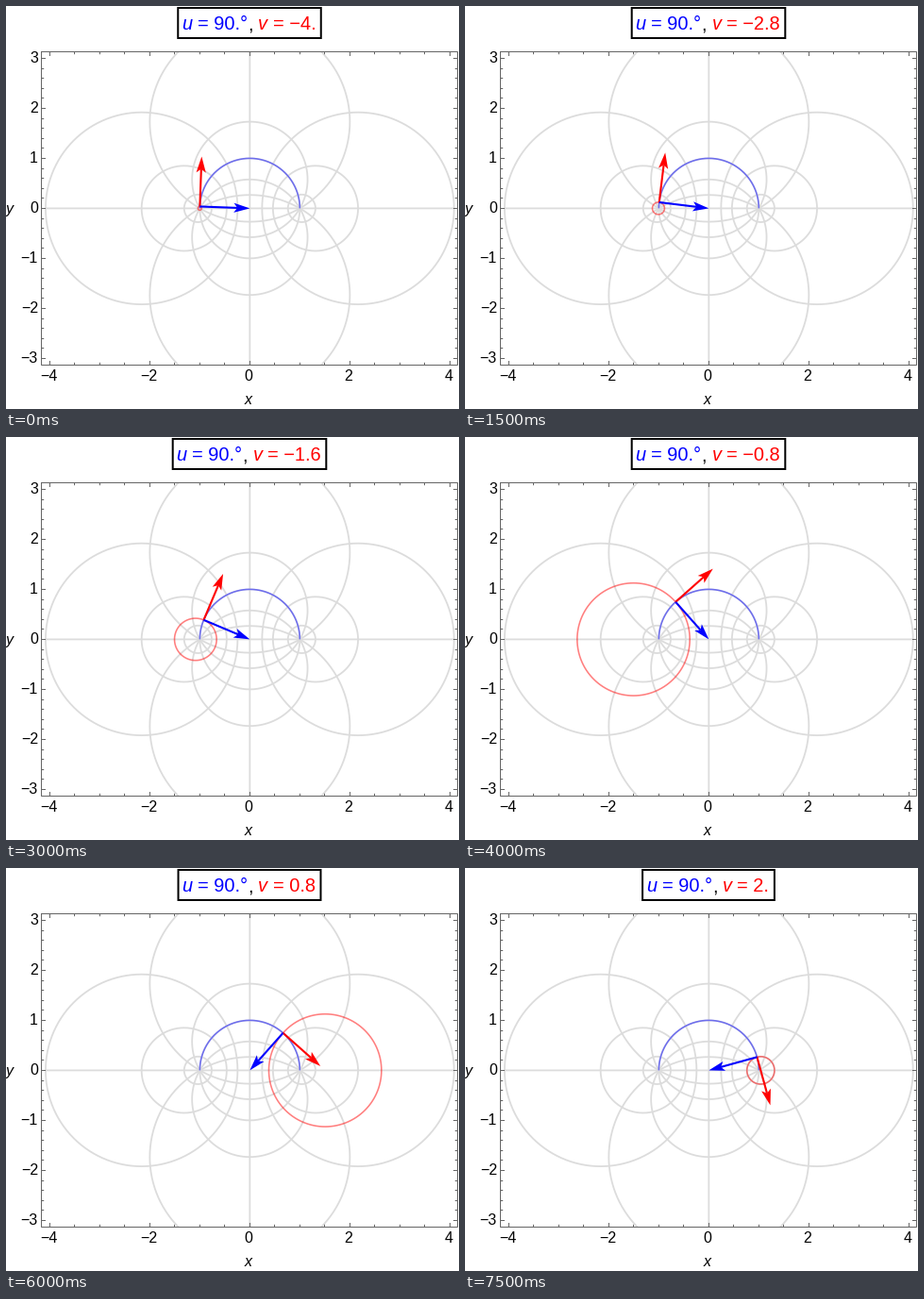
Recreate the animation shown at these times as a matplotlib script. Size 480x427 px, loop 8000 ms.

```python
import numpy as np
import matplotlib.pyplot as plt
from matplotlib.animation import FuncAnimation
from matplotlib.patches import Polygon, Rectangle

W, H, DPI = 480, 427, 64
PT = 72 / DPI                          # points per pixel
CX, CY, UNIT = 258.35, 214.4, 53       # plot origin and scale in pixels
LEFT, RIGHT, TOP, BOTTOM = 37.5, 478.5, 48.5, 380.5
FRAMES, STEP_MS = 16, 500
GREY, FRAME, BLUE, RED = "#dcdcdc", "#666666", "#0000ff", "#ff0000"

plt.rcParams["font.family"] = "Liberation Sans"
fig = plt.figure(figsize=(W / DPI, H / DPI), dpi=DPI, facecolor="white")
ax = fig.add_axes([0, 0, 1, 1])
ax.set_xlim(0, W)
ax.set_ylim(H, 0)
ax.axis("off")
clip = Rectangle((LEFT, TOP), RIGHT - LEFT, BOTTOM - TOP, transform=ax.transData)


def px(x, y):
    return CX + UNIT * np.asarray(x), CY - UNIT * np.asarray(y)


def line(x, y, color, width, **kw):
    item, = ax.plot(x, y, color=color, lw=width * PT, snap=False,
                    solid_capstyle="butt", solid_joinstyle="miter", **kw)
    return item


def curve(points, color, width, **kw):
    item = line(*px(*points), color, width, **kw)
    item.set_clip_path(clip)
    return item


def label(x, y, s, size=16, **kw):
    return ax.text(x, y, s, fontsize=size * PT, va="baseline", **kw)


def circle(x, y, r, start=0, stop=2 * np.pi):
    a = np.linspace(start, stop, 241)
    return x + r * np.cos(a), y + r * np.sin(a)


def v_circle(v):
    if abs(v) < 1e-9:
        return np.zeros(2), np.array([-4, 4])
    return circle(1 / np.tanh(v), 0, 1 / abs(np.sinh(v)))


def u_circle(u):
    return circle(0, 1 / np.tan(u), 1 / abs(np.sin(u)))


# Bipolar grid
for v in (-2, -1, -0.5, 0, 0.5, 1, 2):
    curve(v_circle(v), GREY, 1.8, zorder=1)
for deg in (30, 60, 90, 120, 150):
    curve(u_circle(np.radians(deg)), GREY, 1.8, zorder=1)
reach = 1 / np.tanh(0.25)
curve(([-reach, reach], [0, 0]), GREY, 1.8, zorder=1)

# Frame and ticks
line([LEFT, RIGHT, RIGHT, LEFT, LEFT], [TOP, TOP, BOTTOM, BOTTOM, TOP],
     FRAME, 1, zorder=5)


def ticks(count, step, major):
    for i in range(-count, count + 1):
        yield i * step, 4.5 if i % major == 0 else 2.7


for t, size in ticks(8, 0.5, 4):
    x = np.floor(CX + UNIT * t) + 0.5
    line([x, x], [BOTTOM, BOTTOM - size], FRAME, 1, zorder=5)
    line([x, x], [TOP, TOP + size], FRAME, 1, zorder=5)
for t, size in ticks(15, 0.2, 5):
    y = np.floor(CY - UNIT * t) + 0.5
    line([LEFT, LEFT + size], [y, y], FRAME, 1, zorder=5)
    line([RIGHT, RIGHT - size], [y, y], FRAME, 1, zorder=5)


def signed(n):
    return str(n).replace("-", "\u2212")


for n in range(-4, 5, 2):
    label(257 + UNIT * n, 397, signed(n), ha="center")
for n in range(-3, 4):
    label(34, 219 - UNIT * n, signed(n), ha="right")
label(257, 422, "x", style="italic", ha="center")
label(4, 220, "y", style="italic", ha="center")


class Arrow:
    NECK = 13.2
    HEAD = np.array([[0, 0], [-17, 5.1], [-NECK, 0], [-17, -5.1]])

    def __init__(self, color, z):
        self.shaft = line([], [], color, 2.1, zorder=z)
        self.head = ax.add_patch(Polygon(self.HEAD, fc=color, lw=0, zorder=z))

    def place(self, tail, way):
        start = np.array(px(*tail))
        along = np.array([way[0], -way[1]])
        across = np.array([-along[1], along[0]])
        tip = start + UNIT * along
        neck = tip - self.NECK * along
        self.shaft.set_data([start[0], neck[0]], [start[1], neck[1]])
        self.head.set_xy(tip + self.HEAD @ np.array([along, across]))


class Title:
    """Boxed row of coloured text, centred over the plot."""
    SIZE, MID, PAD = 20, 258, 5.75
    EM = {".": 0.278, ",": 0.278, " ": 0.278, "=": 0.584, "\u2212": 0.584,
          "\u00b0": 0.4, "v": 0.5}
    LOOK = [(BLUE, "italic"), (BLUE, "normal"), ("black", "normal"),
            (RED, "italic"), (RED, "normal")]

    def __init__(self):
        self.box = ax.add_patch(Rectangle((0, 2), 1, 32, fc="white", ec="black",
                                          lw=2 * PT, joinstyle="miter", snap=False))
        self.parts = [label(0, 25, "", self.SIZE, color=c, style=s, zorder=6)
                      for c, s in self.LOOK]

    def advance(self, s):
        return self.SIZE * sum(self.EM.get(ch, 0.556) for ch in s)

    def show(self, value):
        words = ["u", "= 90.\u00b0", ",", "v", "= " + value]
        gaps = [" ", "", " ", " ", ""]
        width = sum(self.advance(w + g) for w, g in zip(words, gaps))
        half = width / 2 + self.PAD - 1
        self.box.set_x(self.MID - half)
        self.box.set_width(2 * half)
        pen = self.MID - width / 2 - 0.8
        for part, word, gap in zip(self.parts, words, gaps):
            part.set_text(word)
            part.set_x(pen)
            pen += self.advance(word + gap)


def number(v):
    s = f"{abs(v):.1f}"
    if s.endswith("0"):
        s = s[:-1]
    return ("\u2212" if v < 0 else "") + s


curve(circle(0, 0, 1, 0, np.pi), BLUE, 1.6, alpha=0.5, zorder=2)
ring = curve(v_circle(1), RED, 1.6, alpha=0.5, zorder=3)
red_arrow = Arrow(RED, 6)
blue_arrow = Arrow(BLUE, 7)
title = Title()


def update(i):
    v = (4 * i - 40) / 10
    x, y = np.tanh(v), 1 / np.cosh(v)
    ring.set_data(*px(*v_circle(v)))
    blue_arrow.place((x, y), (-x, -y))
    red_arrow.place((x, y), (y, -x))
    title.show(number(v))
    return []


anim = FuncAnimation(fig, update, frames=FRAMES, interval=STEP_MS,
                     init_func=lambda: update(0), repeat=True, repeat_delay=0)
plt.show()
```
